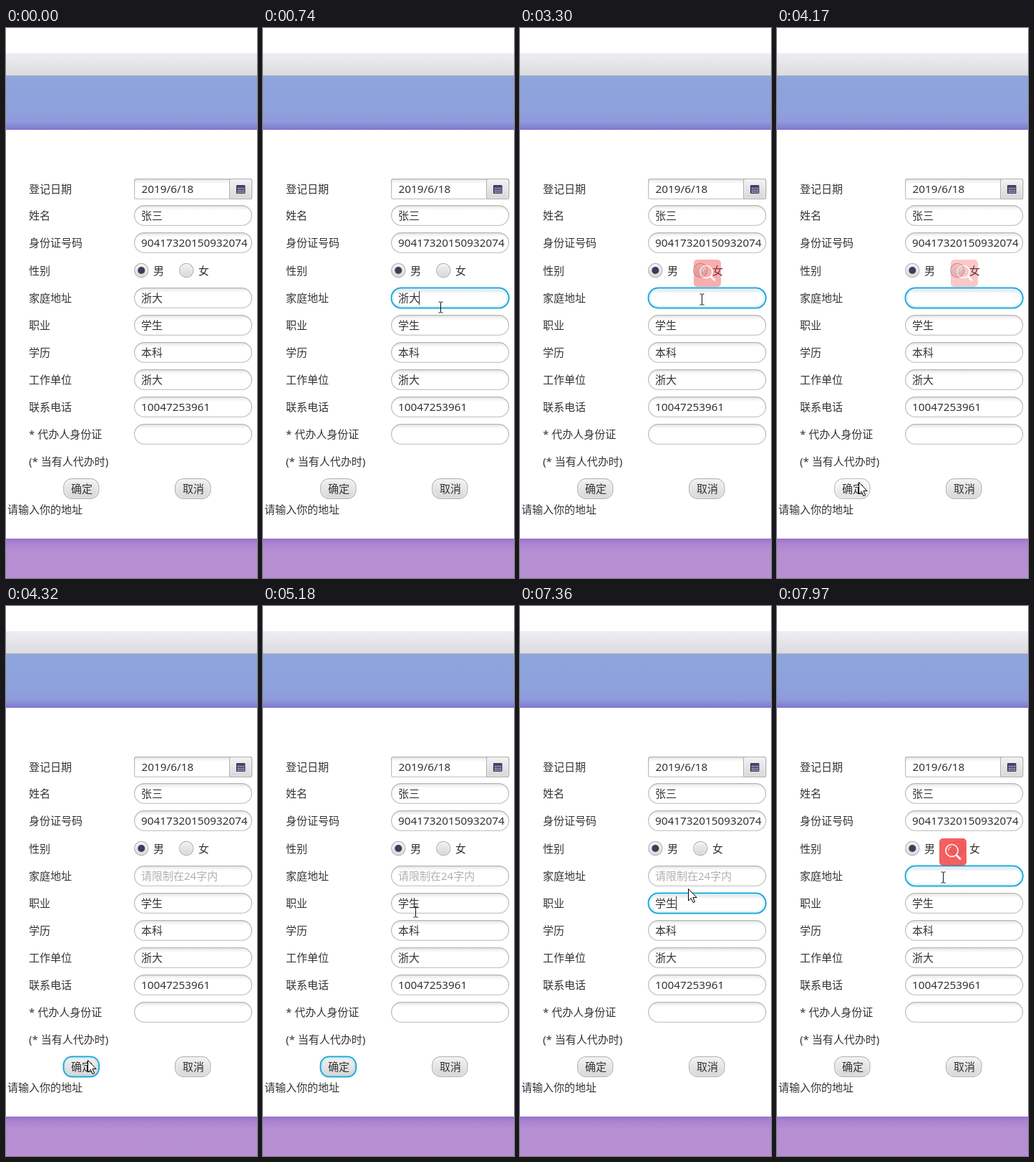
Animation, 351 px wide and 767 px high, one loop 8000 ms. Source, as an HTML page:

```html
<!DOCTYPE html>
<html lang="zh-CN">
<head>
<meta charset="utf-8">
<title>登记表</title>
<style>
  html, body { margin: 0; width: 100%; height: 100%; overflow: hidden; background: #fff; }
  svg { display: block; width: 100vw; height: 100vh; }
  text { font: 15px "Noto Sans", "Noto Sans CJK SC", "Noto Sans CJK", sans-serif; fill: #333; white-space: pre; }
  text.latin { font-size: 15.3px; }
  .hover { filter: brightness(1.05); }
  #hint { fill: #b0b0b0; }
  #picked text { fill: #fff; }
</style>
</head>
<body>
<svg id="stage" viewBox="0 0 351 767" preserveAspectRatio="none">
  <defs>
    <linearGradient id="bar" x2="0" y2="1"><stop stop-color="#eeeef2"/><stop offset="1" stop-color="#dcdce0"/></linearGradient>
    <linearGradient id="sky" x2="0" y2="1">
      <stop stop-color="#8ea5dc"/><stop offset=".6" stop-color="#8ea1dc"/>
      <stop offset=".85" stop-color="#8f9adb"/><stop offset="1" stop-color="#7f76cf"/>
    </linearGradient>
    <linearGradient id="dusk" x2="0" y2="1">
      <stop stop-color="#9a72cd"/><stop offset=".13" stop-color="#ab85d2"/>
      <stop offset=".35" stop-color="#b68fd3"/><stop offset="1" stop-color="#b78fd2"/>
    </linearGradient>
    <linearGradient id="edge" x2="0" y2="1"><stop stop-color="#b4b4b4"/><stop offset="1" stop-color="#c8c8c8"/></linearGradient>
    <linearGradient id="paper" x2="0" y2="1"><stop stop-color="#e8e8e8"/><stop offset=".22" stop-color="#fff"/></linearGradient>
    <linearGradient id="bevel" x2="0" y2="1"><stop stop-color="#fcfcfc"/><stop offset="1" stop-color="#e4e4e4"/></linearGradient>
    <linearGradient id="face" x2="0" y2="1"><stop stop-color="#f0f0f0"/><stop offset="1" stop-color="#d9d9d9"/></linearGradient>
  </defs>

  <rect width="351" height="767" fill="#fff"/>
  <rect y="35" width="351" height="31" fill="url(#bar)"/>
  <rect y="66" width="351" height="1" fill="#b2b2b6"/>
  <rect y="67" width="351" height="75" fill="url(#sky)"/>
  <rect y="712" width="351" height="55" fill="url(#dusk)"/>

  <g id="form"></g>

  <rect x="322" y="219" width="12.500" height="12" rx="1" fill="#443d66"/>
  <path d="M324 223.500h9M324 226.500h9M324 229h9" stroke="#e4e2ec" stroke-width="1.300" stroke-dasharray="1.400 1.200"/>
  <circle cx="189.300" cy="338" r="5" fill="#413a5c"/>

  <text id="value" x="189" y="382">浙大</text>
  <text id="hint" x="189" y="382">请限制在24字内</text>
  <g id="picked">
    <rect x="188" y="367" width="48" height="19" fill="#0096c9"/>
    <text class="latin" x="189" y="382">zhe'da</text>
  </g>
  <path id="caret" d="M.5 0v19" stroke="#333"/>

  <g id="finder">
    <rect width="38" height="38" rx="5" fill="#f23c3c"/>
    <g fill="none" stroke="#fff" stroke-linecap="round">
      <circle cx="17.500" cy="17" r="8.500" stroke-width="1.600"/>
      <path d="M24 23.500l5 5" stroke-width="2.600"/>
      <path d="M12.500 16.500q.5-4 4-4.800"/>
    </g>
  </g>

  <path id="arrow" d="M0 0v16.500l3.800-3.600 2.700 6.200 2.600-1.100-2.700-6h5.200z" fill="#fff" stroke="#000"/>
  <path id="beam" d="M-3-7.500h2.200l.8.800.8-.8H3M-3 7.500h2.200l.8-.8.8.8H3M0-7V7" fill="none" stroke="#111"/>
</svg>
<script>
const $ = id => document.getElementById(id);
const form = $('form');
const scale = 1.25;

function add(tag, attrs, parent = form, text = '') {
  const el = document.createElementNS('http://www.w3.org/2000/svg', tag);
  for (const key in attrs) el.setAttribute(key, attrs[key]);
  el.textContent = text;
  parent.append(el);
  return el;
}

function label(text, x, y) {
  add('text', { x, y, class: /^\d/.test(text) ? 'latin' : '' }, form, text);
}

// Nested rounded boxes; layers are pairs of inset and fill
function stack([x, y, width, height, radius], layers) {
  const group = add('g', {});
  for (const [inset, fill] of layers) {
    const d = inset * scale;
    add('rect', { x: x + d, y: y + d, width: width - 2 * d, height: height - 2 * d, rx: Math.max(radius - d, 1), fill }, group);
  }
  return group;
}

const blue = '#039ed3', faint = '#039ed322';
const paper = [[0, 'url(#edge)'], [1, 'url(#paper)']];
const paperFocus = [[-.2, blue], [1, '#fff'], [-1.4, faint], [3, 'url(#paper)']];
const knob = [[0, '#b5b5b5'], [1, 'url(#bevel)'], [2, 'url(#face)']];
const knobFocus = [[-.2, blue], [1, 'url(#bevel)'], [2, 'url(#face)'], [-1.4, faint], [2.6, 'url(#face)']];

const rowY = i => Math.round(247.3 + 38.1 * i);
const rings = {};

function field(name, i, value) {
  const box = [179, rowY(i), 165.3, 29, 14.5];
  stack(box, paper);
  rings[name] = stack(box, paperFocus);
  label(value, 189, rowY(i) + 20);
}

function button(name, x) {
  const box = [x, 628, 50.5, 29, 12.5];
  const face = stack(box, knob);
  rings[name] = stack(box, knobFocus);
  label(name, x + 11, 648);
  return { x, face };
}

const rows = [
  ['姓名', '张三'], ['身份证号码', '90417320150932074'], ['性别'], ['家庭地址', ''], ['职业', '学生'],
  ['学历', '本科'], ['工作单位', '浙大'], ['联系电话', '10047253961'], ['* 代办人身份证', ''], ['(* 当有人代办时)']
];
rows.forEach(([name, value], i) => {
  label(name, 32, rowY(i) + 20);
  if (value !== undefined) field(name, i, value);
});

label('登记日期', 32, 230);
stack([179, 210, 165.3, 29, 3], paper);
stack([312, 210, 32.3, 29, 3], knob);
label('2019/6/18', 189.5, 230);
['男', '女'].forEach((name, i) => {
  stack([179 + 63 * i, 327.8, 20.5, 20.5, 10.3], knob);
  label(name, 206 + 63 * i, 343.5);
});
label('请输入你的地址', 2, 677);
const buttons = [button('确定', 80), button('取消', 236)];

const states = [
  { at: 0, show: 'value' },
  { at: 540, show: 'value', focus: '家庭地址', caret: [218, 367] },
  { at: 1430, show: 'picked', focus: '家庭地址' },
  { at: 2650, focus: '家庭地址', caret: [188, 367] },
  { at: 4230, show: 'hint', focus: '确定' },
  { at: 7130, show: 'hint', focus: '职业', caret: [218, 405] },
  { at: 7470, focus: '家庭地址', caret: [188, 367] }
];

// Pointer moves: start time, number of steps, destination
const entry = [262, 645];
const moves = [
  [200, 10, [248, 379]], [1980, 2, [240, 378]], [2220, 4, [254, 378]],
  [3620, 8, [114, 633]], [4870, 5, [213, 426]], [5480, 4, [217, 486]],
  [6190, 5, [236, 389]], [6810, 3, [239, 416]], [7280, 6, [232, 378]]
];
const stepTime = 75;
const easeOut = u => 1 - (1 - u) ** 2;

function pointer(t) {
  const i = moves.findLastIndex(m => m[0] <= t);
  if (i < 0) return [-50, -50];
  const [start, count, to] = moves[i];
  const from = i ? moves[i - 1][2] : entry;
  const step = Math.min(Math.floor((t - start) / stepTime) + 1, count);
  return from.map((v, k) => Math.floor(v + (to[k] - v) * easeOut(step / count)));
}

// The finder button pops up, then fades in equal steps
function finder(t) {
  const again = t >= 7510;
  const step = Math.max(0, Math.floor((t - (again ? 7510 : 1115)) / 307));
  const open = again || (t >= 1040 && t < 4230);
  return { x: again ? 227 : 243, y: again ? 324 : 323, opacity: open ? .88 - .067 * step : 0 };
}

const toggle = (el, on) => el.setAttribute('visibility', on ? 'visible' : 'hidden');
const place = (el, x, y) => el.setAttribute('transform', `translate(${x} ${y})`);

function render(t) {
  const state = states.findLast(s => s.at <= t);
  for (const id of ['value', 'hint', 'picked']) toggle($(id), id === state.show);
  for (const name in rings) toggle(rings[name], name === state.focus);

  const blinkOn = Math.floor((t - state.at) / 500) % 2 === 0;
  toggle($('caret'), state.caret && blinkOn);
  if (state.caret) place($('caret'), ...state.caret);

  const pop = finder(t);
  $('finder').setAttribute('opacity', pop.opacity);
  place($('finder'), pop.x, pop.y);

  const [x, y] = pointer(t);
  const overText = x > 179 && x < 344 &&
    rows.some(([, value], i) => value !== undefined && y >= rowY(i) && y <= rowY(i) + 29);
  for (const b of buttons)
    b.face.classList.toggle('hover', x >= b.x && x <= b.x + 50 && y >= 628 && y <= 657);
  toggle($('arrow'), !overText);
  toggle($('beam'), overText);
  for (const id of ['arrow', 'beam']) place($(id), x + .5, y + .5);
}

const origin = performance.now();
function tick() {
  render((performance.now() - origin) % 8000);
  requestAnimationFrame(tick);
}
tick();
</script>
</body>
</html>
```
